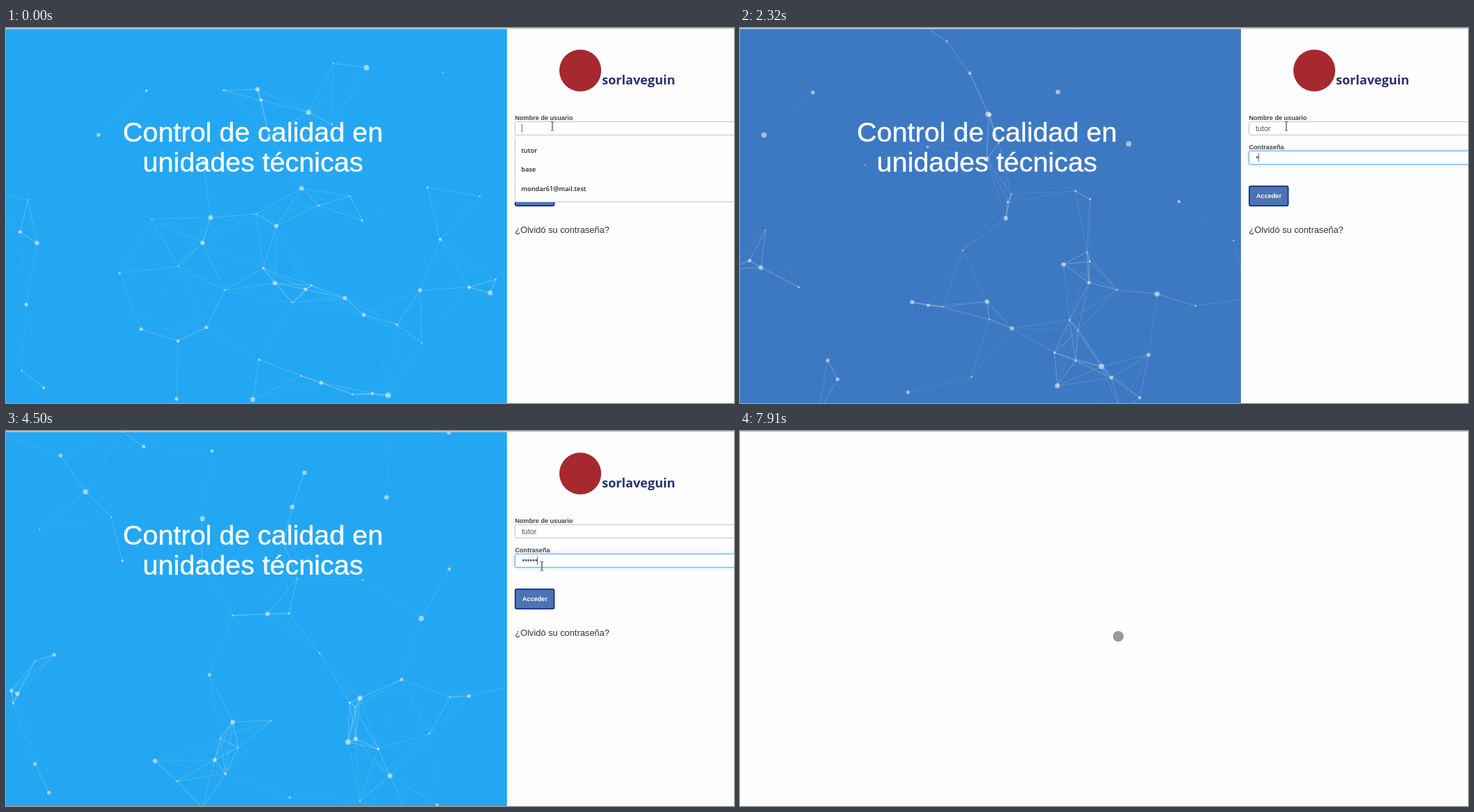
Write an HTML page with a canvas that moves like this. It is 1042 px wide and 538 px high and loops after 8000 ms.

```html
<!DOCTYPE html>
<html lang="es">
<head>
<meta charset="utf-8">
<title>Control de calidad en unidades técnicas</title>
<style>
html, body { margin: 0; width: 100%; height: 100%; overflow: hidden; background: #fdfdfd; }
canvas, svg { position: absolute; left: 0; top: 0; display: block; }
svg { font-family: "Liberation Sans", Arial, sans-serif; }
.title { font-size: 39.4px; fill: #fff; stroke: #fff; stroke-width: .4; text-anchor: middle; }
.brand { font: bold 18px "Open Sans", "Noto Sans", sans-serif; fill: #28306f; }
.label { font-size: 9.1px; font-weight: bold; fill: #444; }
.entry { font-size: 10.7px; fill: #555; }
.dots { font-size: 10.5px; fill: #555; }
.forgot { font-size: 12.8px; fill: #333; }
.field { fill: #fff; stroke: #c4c4c4; }
.glow { fill: #fff; stroke: #66afe9; filter: drop-shadow(0 0 2.5px rgba(102, 175, 233, .6)); }
.menu { font: 600 9.2px "Open Sans", "Noto Sans", sans-serif; fill: #222; }
</style>
</head>
<body>
<canvas id="net" width="717" height="538"></canvas>
<svg width="1042" height="538" viewBox="0 0 1042 538">
  <g id="page">
    <g class="title">
      <text x="353.5" y="162.5">Control de calidad en</text>
      <text x="353.5" y="206">unidades técnicas</text>
    </g>
    <circle cx="822" cy="61" r="30" fill="#a5292e"/>
    <text class="brand" x="853" y="81">sorlaveguin</text>

    <text class="label" x="728.5" y="132">Nombre de usuario</text>
    <rect class="field" x="728.5" y="134.5" width="330" height="19" rx="2"/>
    <rect class="glow" id="userGlow" x="728.5" y="134.5" width="330" height="19" rx="2"/>
    <text class="entry" id="user" x="738" y="148"></text>

    <text class="label" x="728.5" y="173.5">Contraseña</text>
    <rect class="field" x="728.5" y="176.5" width="330" height="19" rx="2"/>
    <rect class="glow" id="passGlow" x="728.5" y="176.5" width="330" height="19" rx="2"/>
    <text class="dots" id="pass" x="738.5" y="189.4"></text>

    <rect id="button" x="729" y="227" width="55.5" height="28" rx="2" stroke="#1f3a93" stroke-width="2"/>
    <text class="label" x="757" y="244" text-anchor="middle" style="fill:#fff">Acceder</text>
    <text class="forgot" x="728.5" y="294">¿Olvidó su contraseña?</text>

    <g class="menu" id="menu">
      <path id="menuBox" stroke="#c4c4c4"/>
      <text x="737.5" y="179">tutor</text>
      <g id="others">
        <text x="737.5" y="206.4">base</text>
        <text x="737.5" y="233.6">mondar61@mail.test</text>
      </g>
    </g>

    <rect id="caret" width="1" height="12" fill="#666"/>
    <path id="beam" d="M-2 -6.5H-.5M.5 -6.5H2M0 -6V5.5M-2 6H-.5M.5 6H2" fill="none" stroke="#222"/>
    <path id="arrow" d="M0 0V12L2.8 9.4L4.7 14L6.6 13.2L4.7 8.8H8.4Z" fill="#fff" stroke="#222" stroke-width=".9"/>
  </g>
  <circle id="loader" cx="541.5" cy="294.7" fill="#999"/>
  <rect width="1042" height="1" fill="#c8c8c8"/>
  <rect y="1" width="1042" height="1" fill="#d8d8d8" opacity=".5"/>
</svg>
<script>
const LOOP = 8000, W = 717, H = 538;
const TAB = 1470, MOVE = 3750, CLICK = 4620, SEND = 4750, REPLY = 5640, LEAVE = 6380, BLANK = 7480;
const $ = id => document.getElementById(id);
const ctx = $("net").getContext("2d");
const show = (el, on) => { el.style.display = on ? "" : "none"; };
const clamp = (v, a, b) => Math.min(b, Math.max(a, v));
const mix = (a, b, p) => a + (b - a) * p;
const ramp = (t, a, b) => clamp((t - a) / (b - a), 0, 1);

// Linear interpolation through [time, value] pairs.
function track(t, keys) {
  const i = keys.findIndex(k => t < k[0]);
  if (i < 0) return keys[keys.length - 1][1];
  if (i === 0) return keys[0][1];
  const [a, b] = [keys[i - 1], keys[i]];
  return mix(a[1], b[1], ramp(t, a[0], b[0]));
}

// The screen refreshes in steps, with two pauses.
function snap(t) {
  const [from, to, step] = t < REPLY ? [0, 5200, 133] : t < BLANK ? [REPLY, LEAVE, 148] : [BLANK, 7909, 143];
  return from + Math.floor((clamp(t, from, to) - from) / step) * step;
}

// Network: large dots by start and end point, small ones seeded.
const LINK = 110, TRIP = LEAVE - (REPLY - SEND), EDGE = 25;
const large = [
  [547, 527, 475, 426], [516, 57, 614, 322], [-50, 224, 155, 53], [433, 121, 243, 127], [693, 380, 460, 384],
  [353, 533, 599, 485], [293, 272, 439, 68], [360, 88, 591, 97], [423, 230, 520, 495], [387, 284, 371, 257]
];
let seed = 4021;
const rnd = () => (seed = seed * 16807 % 2147483647) / 2147483647;
const wrap = (v, size) => {
  const span = size + 2 * EDGE;
  return ((v + EDGE) % span + span) % span - EDGE;
};

const dots = large.map(([x, y, x2, y2], i) => p => ({ x: mix(x, x2, p), y: mix(y, y2, p), r: 4 - i * .1 }));
for (let i = 0; i < 48; i++) {
  const x = rnd() * W, y = rnd() * H, angle = rnd() * 2 * Math.PI, dist = 90 + rnd() * 190, r = .9 + 2.4 * rnd() ** 1.5;
  dots.push(p => ({ x: wrap(x + dist * p * Math.cos(angle), W), y: wrap(y + dist * p * Math.sin(angle), H), r }));
}

const light = [[0, 1], [1596, 0], [2926, .3], [3857, .85], [4300, 1], [REPLY, 1], [LEAVE, 0]];
const dark = [65, 113, 185], bright = [36, 167, 242];

function drawNet(t) {
  const p = track(t, light);
  ctx.globalAlpha = 1;
  ctx.fillStyle = `rgb(${dark.map((c, i) => Math.round(mix(c, bright[i], p)))})`;
  ctx.fillRect(0, 0, W, H);

  // The motion stalls while the form is being sent.
  const run = t - clamp(t - SEND, 0, REPLY - SEND);
  const pts = dots.map(at => at(run / TRIP));
  ctx.strokeStyle = ctx.fillStyle = "#fff";
  pts.forEach((a, i) => {
    for (const b of pts.slice(i + 1)) {
      const d = Math.hypot(a.x - b.x, a.y - b.y);
      if (d >= LINK) continue;
      ctx.globalAlpha = .42 * (1 - d / LINK);
      ctx.beginPath();
      ctx.moveTo(a.x, a.y);
      ctx.lineTo(b.x, b.y);
      ctx.stroke();
    }
  });
  ctx.globalAlpha = .52;
  for (const { x, y, r } of pts) {
    ctx.beginPath();
    ctx.arc(x, y, r, 0, 7);
    ctx.fill();
  }
}

const NAME = "tutor";
const typing = (start, gap, count) => Array.from({ length: count }, (_, i) => start + i * gap);
const userKeys = typing(380, 170, NAME.length), passKeys = typing(2160, 230, 6);
const typed = (keys, t) => keys.filter(k => k <= t).length;

function drawForm(t) {
  const n = typed(userKeys, t), inPass = t >= TAB;
  $("user").textContent = NAME.slice(0, n);
  $("pass").textContent = "•".repeat(typed(passKeys, t));
  $("userGlow").style.opacity = ramp(t, 0, 260) - ramp(t, TAB, 1596);
  $("passGlow").style.opacity = ramp(t, TAB, 1596) - .5 * ramp(t, CLICK, SEND) - .5 * ramp(t, REPLY, 5880);

  show($("menu"), t < 1190);
  show($("others"), n === 0);
  $("menuBox").setAttribute("d", `M728.5 157V${n ? 194.5 : 249.5}H1060`);
  $("menuBox").setAttribute("fill", "none");
  $("menuBack").setAttribute("height", n ? 39 : 94);

  const last = Math.max(0, ...[...userKeys, TAB, ...passKeys].filter(k => k <= t));
  const text = inPass ? $("pass") : $("user");
  const len = text.textContent ? text.getComputedTextLength() : 0;
  show($("caret"), t < CLICK && (t - last) % 1060 < 530);
  $("caret").setAttribute("x", Math.round(738 + len));
  $("caret").setAttribute("y", inPass ? 180 : 138);
  $("button").setAttribute("fill", t < 6190 ? "#4d74b2" : "#4274bb");
}

// White sheet behind the suggestions.
const back = document.createElementNS("http://www.w3.org/2000/svg", "rect");
for (const [k, v] of Object.entries({ id: "menuBack", x: 728, y: 156, width: 330, fill: "#fefefe" })) back.setAttribute(k, v);
$("menu").prepend(back);

const mouseX = [[MOVE, 779], [SEND, 760], [5186, 740], [REPLY, 769], [6010, 998]];
const mouseY = [[3880, 131], [SEND, 239], [5186, 268], [REPLY, 313], [6010, 345]];

function drawMouse(t) {
  const moved = t >= MOVE - 30;
  const x = moved ? track(t, mouseX) : 782, y = moved ? track(t, mouseY) : 141;
  const overField = (y > 134 && y < 154) || (y > 176 && y < 196);
  for (const id of ["beam", "arrow"]) $(id).setAttribute("transform", `translate(${Math.round(x)} ${Math.round(y)})`);
  show($("beam"), overField);
  show($("arrow"), !overField && t < 6190);
}

function draw(ms) {
  const t = snap(ms + 1), open = t < BLANK;
  show($("net"), open);
  show($("page"), open);
  $("loader").setAttribute("r", 7.6 * ramp(t, BLANK, 7909) ** 1.6);
  if (!open) return;
  drawNet(t);
  drawForm(t);
  drawMouse(t);
}

const begin = performance.now();
function tick(now) {
  draw(Math.max(0, now - begin) % LOOP);
  requestAnimationFrame(tick);
}
draw(0);
requestAnimationFrame(tick);
</script>
</body>
</html>
```
